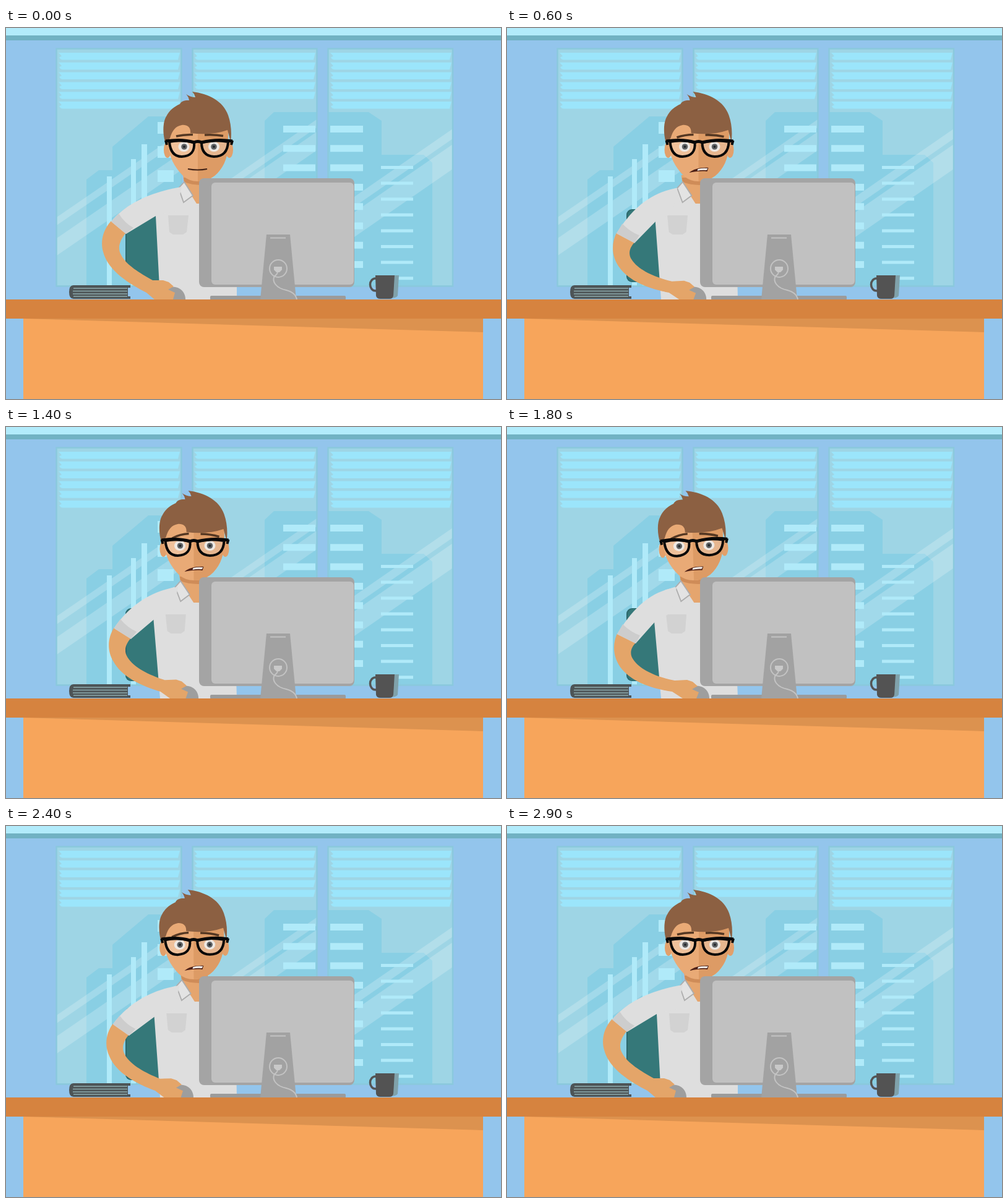
Write an HTML page that moves like this. It is 800 by 600 pixels and loops after 3 s.

```html
<!DOCTYPE html>
<html lang="en">
<head>
<meta charset="utf-8">
<title>Office desk</title>
<style>
html, body { margin: 0; width: 100%; height: 100%; overflow: hidden; background: #93c5ec; }
svg { display: block; width: 800px; height: 600px; }
</style>
</head>
<body>
<svg viewBox="0 0 800 600">
  <defs>
    <clipPath id="panes"><path d="M82 34H283V417H82ZM302 34H502V417H302ZM521 34H722V417H521Z"/></clipPath>
    <clipPath id="rightHalf"><rect x="310" y="140" width="60" height="115"/></clipPath>
  </defs>

  <rect width="800" height="600" fill="#93c5ec"/>
  <rect width="800" height="12" fill="#b2ebfb"/>
  <rect y="12" width="800" height="8" fill="#71b2c3"/>

  <g id="view" clip-path="url(#panes)">
    <rect y="33" width="800" height="385" fill="#9ed5e5"/>
    <path fill="#89cfe4" d="M130 417V245L150 230H172V192L230 143H283V417ZM418 417V150L433 136H586L607 150V205H675L689 218V417Z"/>
    <g fill="#fff" opacity=".2">
      <path d="M82 306L283 168V181L82 319ZM82 340L283 202V230L82 368Z"/>
      <path d="M302 286L502 148V161L302 299ZM302 306L502 168V198L302 336Z"/>
      <path d="M521 302L722 163V179L521 318ZM521 327L722 188V228L521 367Z"/>
    </g>
    <g id="lights" fill="#b0eaf9">
      <path d="M163 240H171V417H163ZM202 212H210V417H202ZM219 188H228V417H219Z"/>
    </g>
    <g id="blinds" fill="#9be5fb"/>
  </g>
  <g fill="none" stroke="#8ac9dd" stroke-width="2.5">
    <rect x="81.500" y="33.500" width="202" height="384"/>
    <rect x="301.500" y="33.500" width="201" height="384"/>
    <rect x="520.500" y="33.500" width="201.500" height="384"/>
  </g>

  <rect x="193" y="293" width="150" height="118" rx="9" fill="#2d686c"/>
  <rect x="195" y="294" width="148" height="116" rx="9" fill="#357879"/>

  <g id="torso">
    <path fill="#dedede" d="M283 257L262 264L238 275L242 304L249 439H373V264L320 250Z"/>
    <path fill="#e5a56e" d="M286 238H330V284H308L288 252Z"/>
    <path fill="#cf8c58" d="M287 242H330V253Q305 256 288 249Z"/>
    <path fill="#e3e3e3" stroke="#adadad" stroke-width="1.800" d="M288 249L279 259L287 282L302 271Z"/>
    <path fill="#d2d2d2" d="M262 303H295L292 330L286 334H270L264 330Z"/>
  </g>
  <path id="mouse" fill="#9e9e9e" d="M262 439V420C280 415 290 427 290 439Z"/>
  <path id="forearm" fill="#e4a569"/>
  <path id="sleeve" fill="#dedede"/>
  <path id="cuff" fill="#cdcdcd"/>

  <g id="head">
    <g fill="#e2a06b">
      <ellipse cx="261" cy="197" rx="6" ry="13"/>
      <ellipse cx="361" cy="197" rx="6" ry="13"/>
    </g>
    <path id="face" fill="#e9aa76" d="M262 150H359V190C358 212 350 228 337 239Q325 248 310 248Q296 248 286 239C272 225 263 207 262 188Z"/>
    <use href="#face" clip-path="url(#rightHalf)" style="fill:#dd9b65"/>
    <path fill="#dd9b65" clip-path="url(#rightHalf)" d="M262 150H359V190C358 212 350 228 337 239Q325 248 310 248Z"/>
    <path fill="#8c6042" d="M258 188C253 172 253 153 259 143C264 133 272 127 281 123C284 117 291 117 296 117Q295 111 291 107Q298 112 306 112Q305 107 301 103C327 106 351 118 359 141C364 155 365 171 363 184L358 165Q333 174 298 170C299 160 292 156 284 157C274 159 269 165 265 178Z"/>
    <g id="brows" fill="none" stroke="#553823" stroke-width="3.600">
      <path id="browL"/><path id="browR"/>
    </g>
    <g id="eyes">
      <path fill="#fff" opacity=".27" d="M264 184Q284 180 304 185Q306 207 284 208Q266 208 264 184ZM316 185Q336 180 359 184Q358 208 336 208Q316 207 316 185Z"/>
      <ellipse cx="287.500" cy="192" rx="9" ry="8" fill="#eee9e4"/>
      <ellipse cx="336" cy="192" rx="9" ry="8" fill="#eee9e4"/>
      <g fill="#606467"><circle cx="288" cy="192" r="4.800"/><circle cx="336" cy="192" r="4.800"/></g>
      <g fill="#25282a"><circle cx="288" cy="192" r="2"/><circle cx="336" cy="192" r="2"/></g>
    </g>
    <g fill="none" stroke="#080808" stroke-width="4" stroke-linejoin="round">
      <path d="M264 184Q284 180 304 185Q306 207 284 208Q266 208 264 184ZM316 185Q336 180 359 184Q358 208 336 208Q316 207 316 185Z"/>
      <path stroke-width="5" d="M258 183Q285 179 304 185Q310 182 316 185Q340 179 366 183"/>
      <path d="M258 182L260 189M366 182L364 189"/>
    </g>
    <path id="calm" fill="none" stroke="#422317" stroke-width="2.200" d="M294 228Q310 231 325 228"/>
    <g id="upset">
      <path fill="#4d2016" d="M295 234C302 228 313 225 326 226L324 232C314 231 304 232 295 234Z"/>
      <path fill="#f4efea" d="M309 228Q317 226 325 227L323 230Q315 229 308 231Z"/>
    </g>
  </g>

  <rect x="330" y="433" width="219" height="7" rx="2" fill="#9b9b9b"/>
  <rect x="312" y="243" width="251" height="176" rx="8" fill="#a4a4a4"/>
  <rect x="332" y="250" width="230" height="165" rx="6" fill="#c1c1c1"/>
  <path fill="#a2a2a2" d="M421 334H459L469 439H411Z"/>
  <g fill="none" stroke="#c3c3c3" stroke-width="2">
    <path d="M427 339.500H452"/>
    <circle cx="440" cy="389" r="14"/>
    <path d="M439 394Q439 398 434 401C429 410 437 421 453 424Q468 428 470 439"/>
  </g>
  <path fill="#c9c9c9" d="M433 386H446V391L442 395H437L433 391Z"/>

  <path fill="#4d5456" d="M109 416H201V420H197V434H201V438H109Q102 438 102 427T109 416Z"/>
  <path fill="none" stroke="#7e9698" stroke-width="2" d="M109 421H196M108 425.500H196M108 430H196M109 434H196"/>

  <ellipse cx="597" cy="415" rx="8.500" ry="10" fill="none" stroke="#545454" stroke-width="3.500"/>
  <path fill="#80a2ab" d="M620 400H635L633 433Q631 437 620 437Z"/>
  <path fill="#535353" d="M597 400H628L626 433Q625 438 620 438H605Q599 438 598 433Z"/>

  <rect y="439" width="800" height="31" fill="#d6833f"/>
  <rect x="28" y="470" width="743" height="130" fill="#f7a55b"/>
  <path fill="#dc924f" d="M28 470H771V492Z"/>
</svg>
<script>
const $ = id => document.getElementById(id);
const set = (id, name, value) => $(id).setAttribute(name, value);

function addPath(parent, d) {
  const p = document.createElementNS('http://www.w3.org/2000/svg', 'path');
  p.setAttribute('d', d);
  $(parent).append(p);
}

function addBars(x, y, w, h, step, count) {
  for (let i = 0; i < count; i++) addPath('lights', `M${x} ${y + i * step}h${w}v${h}h${-w}z`);
}
addBars(245, 152, 26, 19, 39, 3);
addBars(448, 158, 52, 11, 31.3, 3);
addBars(524, 158, 53, 11, 31.3, 8);
addBars(606, 223, 52, 5, 25.6, 8);

for (const [x, rows] of [[85, 6], [304, 5], [524, 6]])
  for (let i = 0; i < rows; i++)
    addPath('blinds', `M${x} ${40 + i * 15.8}h196l-3 11.500h-186q-4 0 -6 -4l4 -2z`);

// Each limb blends between the arm drawn back (first) and pushed forward (second).
const limbs = {
  forearm: [
    'M170 312C157 326 152 345 157 362C165 393 200 414 227 428L240 439L270 439L273 428L262 423L271 418L263 411L254 408L237 408C216 396 195 384 186 367C179 355 185 342 194 331Z',
    'M178 334C170 352 171 374 186 392C203 412 233 423 267 428L284 439L306 439L310 429L299 424L308 419L300 412L291 409L271 410C244 405 215 393 204 376C197 366 201 356 208 349Z'
  ],
  sleeve: [
    'M284 257C240 264 196 281 170 313L194 333L242 304L275 296Z',
    'M274 259C232 266 205 291 178 335L208 350L240 314L266 300Z'
  ],
  cuff: [
    'M182 300L170 313L194 333L206 323Q192 316 182 300Z',
    'M187 319L178 335L208 350L215 337Q200 332 187 319Z'
  ]
};

function blend(a, b, k) {
  const to = b.match(/[\d.]+/g);
  let i = 0;
  return a.replace(/[\d.]+/g, n => (+n + (to[i++] - n) * k).toFixed(2));
}

const tracks = {
  reach: [[0, 0], [300, .51], [650, .93], [1000, .73], [1300, .5], [1400, .57], [1800, 1], [2400, .35], [2900, 0], [3000, 0]],
  lean: [[0, 0], [300, .4], [1000, .85], [1400, .85], [1800, 1], [2400, .55], [2900, 0], [3000, 0]],
  shift: [[0, 0], [300, -.5], [700, -.5], [1000, -2.5], [1400, -6.5], [1800, -8], [2400, -6.5], [2900, 0], [3000, 0]],
  tilt: [[0, 0], [600, 0], [1000, .9], [1400, 0], [1800, -1.8], [2400, -.3], [2900, 0], [3000, 0]],
  worry: [[0, 0], [400, 0], [900, 1], [1800, 1], [2400, .9], [2900, .1], [3000, 0]]
};

function at(track, t) {
  const i = track.findIndex(key => key[0] > t);
  const [t0, v0] = track[i - 1], [t1, v1] = track[i];
  return v0 + (v1 - v0) * (t - t0) / (t1 - t0);
}

function draw(now) {
  const t = Math.floor(now % 3000 / 100) * 100;
  const pose = {};
  for (const name in tracks) pose[name] = at(tracks[name], t);
  const { reach, lean, shift, tilt, worry } = pose;

  for (const id in limbs) set(id, 'd', blend(...limbs[id], reach));
  set('mouse', 'transform', `translate(${37 * reach} 0)`);
  set('torso', 'transform', `translate(0 438) skewX(${2.1 * lean}) translate(0 -438)`);
  set('head', 'transform', `translate(${shift} 0) rotate(${tilt} 310 245)`);
  set('browL', 'd', `M275 ${175 + 5 * worry}Q288 ${172 + worry} 302 172.500`);
  set('browR', 'd', `M321 173Q337 ${172 + worry} 351 ${174.5 + 3 * worry}`);
  set('calm', 'visibility', t < 600 ? 'visible' : 'hidden');
  set('upset', 'visibility', t < 600 ? 'hidden' : 'visible');
}

const start = performance.now();
function tick() {
  draw(performance.now() - start);
  requestAnimationFrame(tick);
}
tick();
</script>
</body>
</html>
```
